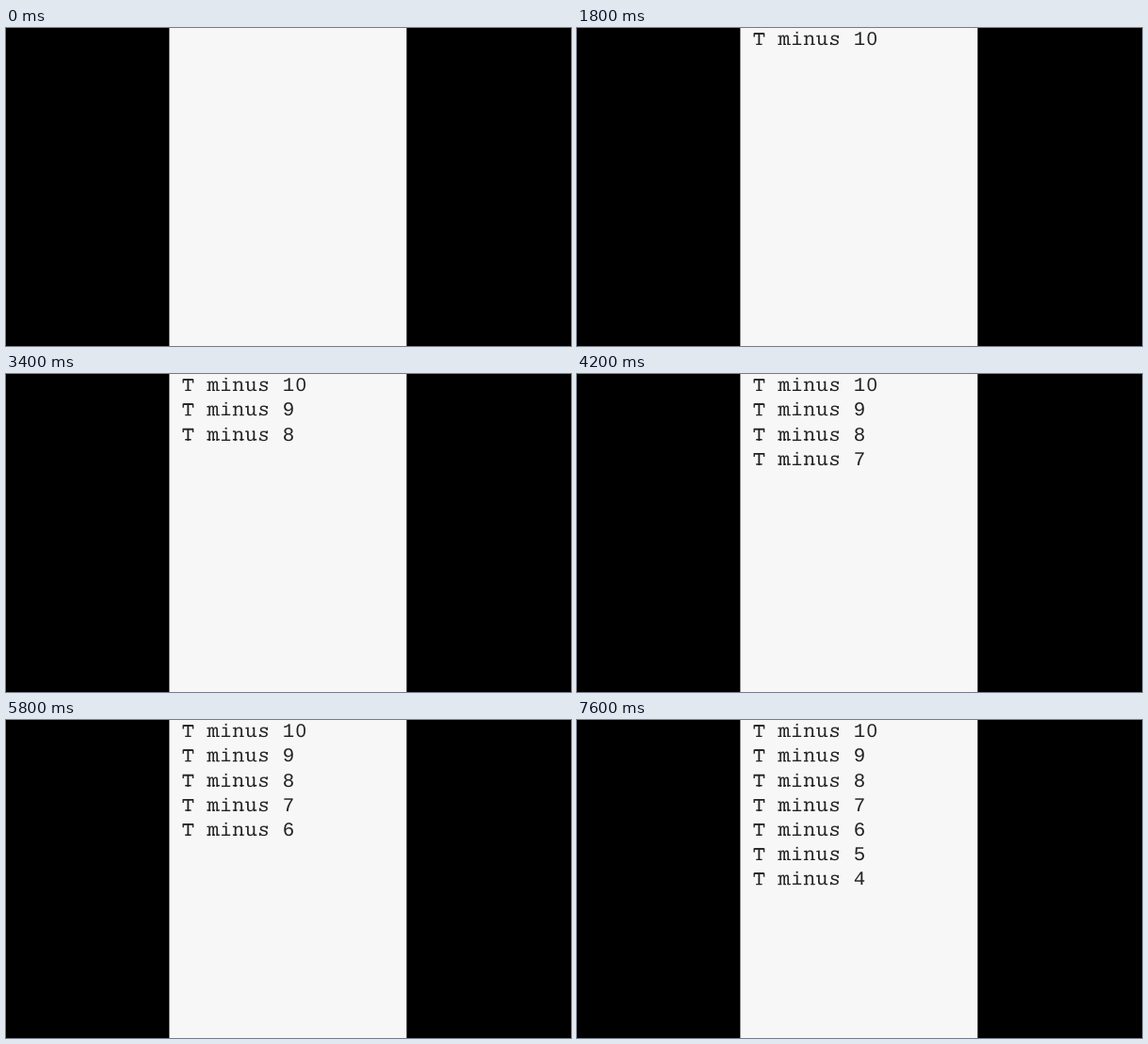
These frames come from a looping animation (600 px wide and 338 px high, 8 s). An HTML page:

```html
<!DOCTYPE html>
<html lang="en">
<head>
<meta charset="utf-8">
<title>Countdown</title>
<style>
  html, body { margin: 0; width: 100%; height: 100%; overflow: hidden; background: #000; }
  svg { display: block; width: 100vw; height: 100vh; }
  .page { fill: #f8f7f8; }
  text { fill: #222; font-family: "Liberation Mono", monospace; text-rendering: geometricPrecision; }
  .words { font-size: 19.5px; letter-spacing: 1.65px; }
  .digit { font-size: 20.8px; text-anchor: middle; }
  .zero { font: 19.8px "Liberation Sans", sans-serif; }
  .slabs { fill: none; stroke: #222; stroke-width: 1.4px; }

  /* The cover drops one line each second. */
  .cover { animation: reveal 8s step-end infinite; }
  @keyframes reveal {
    0%    { transform: translateY(0); }
    15%   { transform: translateY(24px); }
    27.5% { transform: translateY(50.2px); }
    40%   { transform: translateY(76.4px); }
    52.5% { transform: translateY(102.6px); }
    65%   { transform: translateY(128.8px); }
    77.5% { transform: translateY(155px); }
    90%   { transform: translateY(181.2px); }
  }
</style>
</head>
<body>
<svg viewBox="0 0 600 338" preserveAspectRatio="none">
  <defs>
    <g id="label">
      <text class="words" x="187.55">T minus</text>
      <g class="slabs">
        <path transform="translate(193.4)" d="M-5.8-12.1H5.8M-5.2-12.1V-8.6M5.2-12.1V-8.6M-3.2-.7H3.2"/>
        <path transform="translate(220.1)" d="M-6.7-9.5H-4.5M-6.7-.7H-2.7M-.8-.7H1.9M3.6-.7H6.7"/>
        <path transform="translate(246.8)" d="M-5.9-9.5H-3.6M-5.9-.7H-1.4M1.4-.7H5.9"/>
        <path transform="translate(260.2)" d="M-6-9.5H-3.6M1.4-9.5H3.6M3.6-.7H6"/>
        <path transform="translate(273.5)" d="M3.7-10.3V-7.2M-3.9-3.1V0"/>
      </g>
    </g>
  </defs>

  <rect width="600" height="338"/>
  <rect class="page" x="173.4" width="252" height="338"/>
  <g id="lines"></g>
  <rect class="page cover" x="175" width="249" height="338"/>
</svg>
<script>
  const digit = (char, i) =>
    `<text class="digit${char === "0" ? " zero" : ""}" x="${299.9 + i * 13.3}">${char}</text>`;

  const line = (count, row) =>
    `<g transform="translate(0 ${18.1 + row * 26.2})">
      <use href="#label"/>${[...String(count)].map(digit).join("")}
    </g>`;

  document.getElementById("lines").innerHTML =
    [10, 9, 8, 7, 6, 5, 4].map(line).join("");
</script>
</body>
</html>
```
